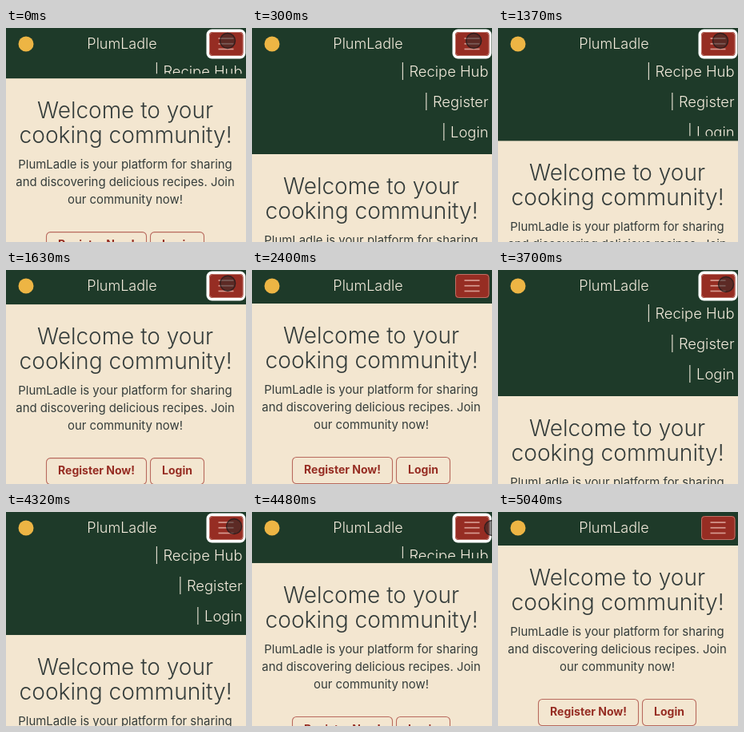
These frames come from a looping animation (300x268 px, 7.22 s). An HTML page with a canvas:

```html
<!DOCTYPE html>
<html lang="en">
<head>
<meta charset="utf-8">
<title>Recipe community</title>
<style>
  html, body { margin: 0; width: 100%; height: 100%; overflow: hidden; background: #f3e6d0; }
  canvas { display: block; width: 300px; height: 268px; }
</style>
</head>
<body>
<canvas id="stage"></canvas>
<script>
const W = 300, H = 268, LOOP = 7220;
const BAR = 42, MENU = 116, SLIDE = 350;
const GREEN = '#1e3a29', BEIGE = '#f3e6d0', RED = '#962d23', INK = '#353d3b', CREAM = '#f4ecdd';
const FONT = 'Inter, "Open Sans", sans-serif';
const BRAND = 'PlumLadle';

const canvas = document.getElementById('stage');
const ctx = canvas.getContext('2d');
const dpr = window.devicePixelRatio || 1;
canvas.width = W * dpr;
canvas.height = H * dpr;

const clamp = v => Math.max(0, Math.min(1, v));
const ramp = (t, start, length) => clamp((t - start) / length);

// CSS "ease": cubic-bezier(.25, .1, .25, 1)
function ease(x) {
  if (x <= 0 || x >= 1) return clamp(x);
  const bez = (u, a, b) => 3 * u * (1 - u) * (1 - u) * a + 3 * u * u * (1 - u) * b + u * u * u;
  let lo = 0, hi = 1;
  for (let i = 0; i < 24; i++) {
    const mid = (lo + hi) / 2;
    if (bez(mid, 0.25, 0.25) < x) lo = mid; else hi = mid;
  }
  return bez(lo, 0.1, 1);
}

const slide = (t, start) => ease(ramp(t, start, SLIDE));

function menuHeight(t) {
  return MENU * (slide(t, -51) - slide(t, 1326) + slide(t, 3350) - slide(t, 4303));
}

function ringAlpha(t) {
  if (t < 2400) return 1;
  return ramp(t, 3350, 150) - ramp(t, 4670, 150);
}

// Pointer stops: time, x, y
const POINTER = [
  [0, 277, 16], [1370, 278, 16], [1690, 277, 17], [1960, 315, 20],
  [2950, 315, 18], [3200, 287, 16], [3390, 285, 18], [4320, 285, 18],
  [4480, 300, 20], [4600, 315, 22]
];

function pointerAt(t) {
  const i = POINTER.findIndex(p => p[0] > t);
  if (i < 0) return null;
  const [t0, x0, y0] = POINTER[i - 1], [t1, x1, y1] = POINTER[i];
  const k = (t - t0) / (t1 - t0);
  return [x0 + (x1 - x0) * k, y0 + (y1 - y0) * k];
}

function text(str, x, y, size, weight, color, align = 'center') {
  ctx.font = `${weight} ${size}px ${FONT}`;
  ctx.textAlign = align;
  ctx.fillStyle = color;
  ctx.fillText(str, x, y);
}

function box(x, y, w, h, r) {
  ctx.beginPath();
  ctx.roundRect(x, y, w, h, r);
}

function disc(x, y, r) {
  ctx.beginPath();
  ctx.arc(x, y, r, 0, Math.PI * 2);
}

function outlineButton(label, x, w, y) {
  box(x + 0.5, y + 0.5, w - 1, 33, 5);
  ctx.strokeStyle = '#b8695d';
  ctx.lineWidth = 1.1;
  ctx.stroke();
  text(label, x + w / 2, y + 21, 14, 700, RED);
}

function drawPage(dy) {
  text('Welcome to your', 149, 92 + dy, 28, 300, INK);
  text('cooking community!', 149.5, 123 + dy, 28.2, 300, INK);
  const intro = [BRAND + ' is your platform for sharing',
    'and discovering delicious recipes. Join', 'our community now!'];
  intro.forEach((line, i) => text(line, 149, 155 + i * 22 + dy, 14.9, 400, INK));
  outlineButton('Register Now!', 50, 126, 234 + dy);
  outlineButton('Login', 180, 68, 234 + dy);
}

function drawHeader(open) {
  ctx.fillStyle = GREEN;
  ctx.fillRect(0, 0, W, BAR + open);
  disc(25, 20, 9.5);
  ctx.fillStyle = '#edb544';
  ctx.fill();
  text(BRAND, 145, 25.5, 18, 300, CREAM);

  ctx.save();
  ctx.beginPath();
  ctx.rect(0, 36, W, open);
  ctx.clip();
  ['Recipe Hub', 'Register', 'Login'].forEach((item, i) =>
    text('| ' + item, 295.5, 61 + i * 38, 18.4, 300, CREAM, 'right'));
  ctx.restore();
}

function drawToggler(alpha) {
  if (alpha > 0) {
    ctx.globalAlpha = alpha;
    box(250.5, 1.5, 49, 37, 7);
    ctx.fillStyle = '#fff';
    ctx.fill();
    ctx.globalAlpha = 1;
  }
  box(254, 5, 42.5, 30, 4);
  ctx.fillStyle = RED;
  ctx.fill();
  box(254.5, 5.5, 41.5, 29, 4);
  ctx.strokeStyle = '#bd7166';
  ctx.lineWidth = 1;
  ctx.stroke();
  ctx.fillStyle = '#d69a90';
  for (let i = 0; i < 3; i++) ctx.fillRect(265.5, 12.2 + i * 6.7, 19, 1.7);
}

function drawPointer(pos) {
  if (!pos) return;
  disc(pos[0], pos[1], 9.5);
  ctx.fillStyle = 'rgba(45, 40, 40, 0.55)';
  ctx.fill();
  ctx.strokeStyle = 'rgba(35, 28, 28, 0.8)';
  ctx.lineWidth = 1.4;
  ctx.stroke();
}

function draw(t) {
  const open = menuHeight(t);
  ctx.setTransform(dpr, 0, 0, dpr, 0, 0);
  ctx.fillStyle = BEIGE;
  ctx.fillRect(0, 0, W, H);
  drawPage(open);
  drawHeader(open);
  drawToggler(ringAlpha(t));
  drawPointer(pointerAt(t));
}

const start = performance.now();
function tick() {
  draw((performance.now() - start) % LOOP);
  requestAnimationFrame(tick);
}
tick();
</script>
</body>
</html>
```
